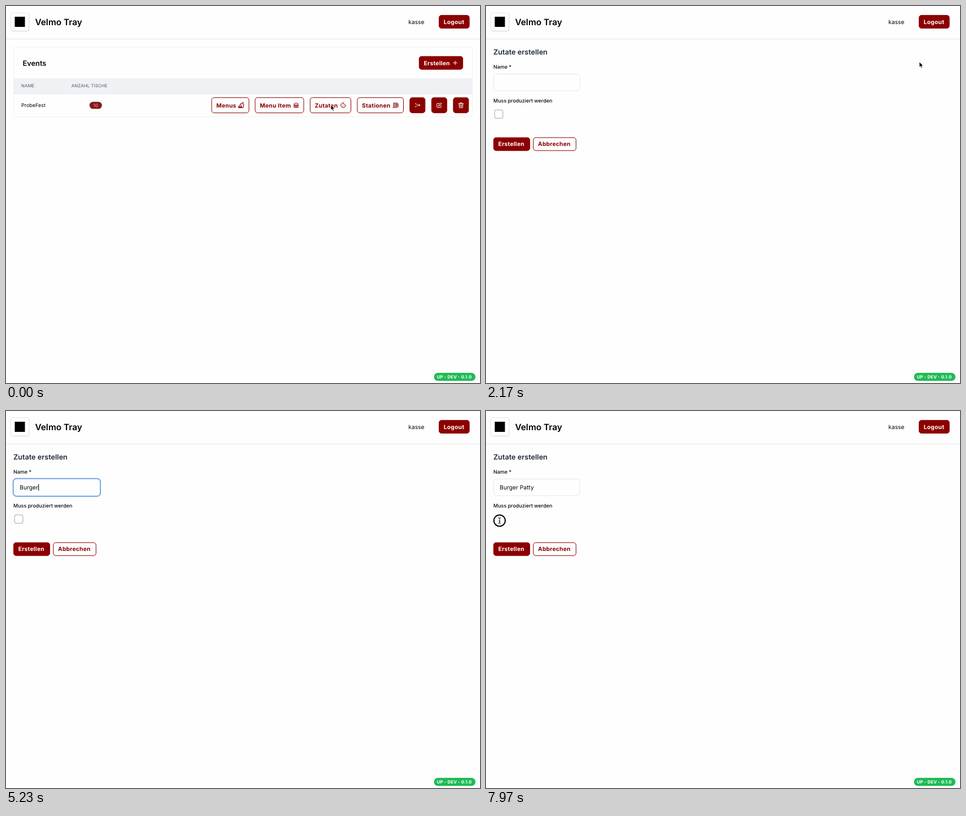
Animation of 839 by 668 pixels, one loop 8000 ms. Source, as an HTML page:

```html
<!DOCTYPE html>
<html lang="de">
<head>
<meta charset="utf-8">
<title>Zutat erstellen</title>
<style>
  html, body { margin: 0; width: 100%; height: 100%; overflow: hidden; background: #fefefe; }
  svg { display: block; width: 839px; height: 668px; }
  text { font-family: Inter, "Liberation Sans", sans-serif; text-rendering: geometricPrecision; white-space: pre; }
  .icon { fill: none; stroke-width: 1; stroke-linecap: round; stroke-linejoin: round; }
</style>
</head>
<body>
<svg id="stage" viewBox="0 0 839 668"></svg>
<script>
const RED = '#8b0000', INK = '#05070d', GREY = '#e5e7eb', PAPER = '#fefefe';

// y is the middle of the capital letters
const text = (s, x, y, size, weight = 400, fill = INK, more = '') =>
  `<text x="${x}" y="${y + size * 0.364}" font-size="${size}" font-weight="${weight}" fill="${fill}" ${more}>${s}</text>`;
const rect = (x, y, w, h, r, fill, stroke = 'none', more = '') =>
  `<rect x="${x}" y="${y}" width="${w}" height="${h}" rx="${r}" fill="${fill}" stroke="${stroke}" ${more}/>`;
const line = (x, y, w, color) => rect(x, y, w, 1, 0, color);
const wide = 'letter-spacing=".025em"';

const icons = {
  plus: 'M-3.3 0H3.3M0-3.3V3.3',
  back: 'M1.5-3L-1.5 0L1.5 3',
  meal: 'M-4.5 4.5H1V2.5H-4.5zM-4.5 2.5Q-4.5 0-1.8 0Q1 0 1 2.5M-2-.5V-2.5H4.5L3.5 4.5H1.5M1-2.5L2-5H4.2M-4 3.6H1',
  burger: 'M-4-1Q-4-4 0-4Q4-4 4-1zM-4 .8H4M-4 2.4H4V3Q4 4 3 4H-3Q-4 4-4 3z',
  cookie: 'M0-4.3A4.3 4.3 0 1 0 4.3 0Q2.5.2 2.2-1.6Q.2-2 0-4.3M-1.8-1.2h.1M-1.5 1.8h.1M1.3 1.7h.1M0 .2h.1',
  station: 'M-4 4V-4H1V4M-5 4H2M-2.8-2H-.3M-2.8 0H-.3M-2.8 2H-.3M1-2.5H2.5V2Q2.5 3.2 3.5 3.2Q4.4 3.2 4.4 2V-2L3-4',
  merge: 'M-4.2-2.6H-3Q-1.5-2.6-.8-.8Q-.4 0 .5 0H4.2M-4.2 2.6H-3Q-1.8 2.6-1.2 1.4M2.4-2L4.4 0L2.4 2',
  edit: 'M0-3.3H-3Q-4-3.3-4-2.3V3Q-4 4-3 4H2.3Q3.3 4 3.3 3V.5M-1.2 1.3L-.8-.6L3-4.2L4.2-3L.6.8z',
  trash: 'M-4.3-2.8H4.3M-1.6-2.8V-4.2H1.6V-2.8M-3.3-2.8L-2.8 4.4H2.8L3.3-2.8M-1.1-.8V2.5M1.1-.8V2.5'
};
const icon = (name, x, y, color) =>
  `<path class="icon" d="${icons[name]}" stroke="${color}" transform="translate(${x} ${y})"/>`;

function button(label, x, y, w, h, solid, mark) {
  const color = solid ? '#fff' : RED, mid = y + h / 2;
  return rect(x, y, w, h, 4.3, solid ? RED : PAPER, RED) +
    (label ? text(label, x + 8.2, mid, 10.24, 700, color, wide) : '') +
    (mark ? icon(mark, label ? x + w - 13.5 : x + w / 2, mid, color) : '');
}

function card(bottom, heads) {
  return rect(13.5, 72.5, 812, bottom - 72.5, 5, 'none', '#f1f2f4') +
    rect(14, 128, 811.5, 27, 0, '#eff1f5') + line(14, 155, 811.5, GREY) +
    heads.map(([s, x]) => text(s, x, 141.7, 7.68, 400, '#4b5563', wide)).join('') +
    button('Erstellen', 731.3, 89.3, 77.3, 23, true, 'plus');
}

const header =
  rect(9, 13, 32.5, 32.5, 4, '#e9eaec') + rect(8.5, 12, 32, 32, 4, '#fff', '#e2e4e8') +
  rect(15.5, 19, 18, 18, 0, '#000') +
  text('Velmo Tray', 51.5, 28.5, 15.36, 600, '#000') +
  text('kasse', 712.3, 28.2, 10.24) +
  button('Logout', 766.5, 16.4, 53.6, 23, true) + line(0, 58, 839, GREY) +
  rect(757.5, 650, 73.5, 14.3, 7.1, '#20bb56') +
  text('UP - DEV - 0.1.0', 762.8, 657, 7.68, 700, '#fff', wide);

const events = card(196.5, [['NAME', 27], ['ANZAHL TISCHE', 115.8]]) +
  text('Events', 29.5, 101, 12.8, 600) +
  text('ProbeFest', 27, 176, 8.96) +
  rect(147.8, 169.7, 22, 12.6, 6.3, '#7f1d1d') +
  text('10', 158.8, 176, 7.68, 400, '#f3a3a3', 'text-anchor="middle"') +
  [['Menus', 364, 66, 'meal'], ['Menu Item', 441, 86, 'burger'],
   ['Zutaten', 538.3, 72.2, 'cookie'], ['Stationen', 621.8, 81.7, 'station']]
    .map(([s, x, w, mark]) => button(s, x, 162.3, w, 27, false, mark)).join('') +
  ['merge', 'edit', 'trash'].map((mark, i) => button('', 714.8 + i * 38.5, 162.3, 27, 27, true, mark)).join('');

const items = card(185.5, [['NAME', 27], ['MUSS PRODUZIERT WERDEN', 281.8]]) +
  button('', 30.3, 89.3, 27, 23, true, 'back') +
  text('Zutaten', 68, 101, 12.8, 600) + icon('cookie', 133, 100.7, INK) +
  text('No Items', 121.8, 170.5, 8.96);

const form = text('Zutate erstellen', 13, 81.8, 12.65, 600, '#1f2937') +
  text('Name *', 13, 108, 8.96, 500) +
  rect(13.5, 120.5, 152.5, 29.5, 5, PAPER, GREY) +
  rect(12.7, 119.7, 154.4, 31.4, 6, PAPER, '#76a5e6', 'id="focus" stroke-width="2"') +
  text('', 24.3, 135.5, 10.24, 400, INK, 'id="value"') +
  rect(0, 129.5, 1.1, 11.5, 0, '#000', 'none', 'id="caret"') +
  text('Muss produziert werden', 13, 168, 8.96, 500) +
  rect(15.2, 184.2, 14.6, 14.6, 3, '#fff', '#c9cacd', 'id="box" stroke-width="1.8"') +
  button('Erstellen', 13.5, 233.2, 64, 23, true) + button('Abbrechen', 83.8, 233.2, 75.5, 23, false);

const stage = document.getElementById('stage');
stage.innerHTML = header +
  `<g id="events">${events}</g><g id="items">${items}</g><g id="form">${form}</g>
  <g id="pointer">
    <circle id="ring" fill="#fff" fill-opacity=".75" stroke="#000" stroke-width="2"/>
    <path id="arrow" d="M0 0V9.6L2.2 7.6L3.7 11.2L5.4 10.5L3.9 7H7z" fill="#000" stroke="#fff" stroke-width=".8"/>
    <path id="beam" class="icon" stroke="#000" d="M-2-5Q0-5 0-4Q0-5 2-5M0-4V4M-2 5Q0 5 0 4Q0 5 2 5M-1 1H1"/>
  </g>`;
const el = {};
stage.querySelectorAll('[id]').forEach(e => el[e.id] = e);
const show = (e, on) => e.style.display = on ? '' : 'none';

const ease = {
  in: u => u * u,
  out: u => u * (2 - u),
  both: u => u * u * (3 - 2 * u)
};
// time, x, y, easing towards this point
const path = [
  [0, 575, 175], [900, 575, 175, 'both'], [1530, 648, 111, 'in'], [1850, 768, 100, 'out'],
  [2170, 767, 99, 'both'], [2380, 767, 99, 'both'], [2970, 129, 142, 'both'],
  [6970, 129, 142, 'both'], [7130, 123, 143.5, 'in'], [7700, 24, 194.2, 'both'], [8000, 24, 194.2, 'both']
];
const clicks = [320, 1890, 3060, 7830], PRESS = 170;
const TYPED = 'Burger Patty';
const keys = [3950, 4150, 4370, 4950, 5080, 5210, 5920, 6050, 6170, 6290, 6400, 6500];
const LIST_END = 520, ITEMS_END = 2080, FOCUS = 3110, BLUR = 7830, BLINK = 490;

function pointerAt(t) {
  const i = path.findIndex(p => p[0] > t), [t0, x0, y0] = path[i - 1], [t1, x1, y1, kind] = path[i];
  const u = ease[kind]((t - t0) / (t1 - t0));
  return [x0 + (x1 - x0) * u, y0 + (y1 - y0) * u];
}

function drawField(t) {
  const focused = t >= FOCUS && t < BLUR;
  const count = keys.filter(k => k <= t).length;
  const idle = t - (count ? keys[count - 1] : FOCUS);
  const fade = Math.min(1, Math.max(0, (idle % (2 * BLINK) - BLINK) / 80));
  el.value.textContent = TYPED.slice(0, count);
  el.caret.setAttribute('x', 24.6 + (count ? el.value.getComputedTextLength() : 0));
  el.caret.setAttribute('opacity', 1 - fade);
  show(el.focus, focused);
  show(el.caret, focused);
  show(el.box, t < BLUR);
}

function drawPointer(t) {
  const [x, y] = pointerAt(t), beam = t >= 2900;
  const press = clicks.find(c => t >= c && t < c + PRESS);
  el.pointer.setAttribute('transform', `translate(${x} ${y})`);
  show(el.pointer, t < keys[0] || t >= 6970); // hidden while typing
  show(el.arrow, !beam);
  show(el.beam, beam);
  show(el.ring, press !== undefined);
  el.ring.setAttribute('r', 10 + 3 * Math.max(0, 1 - (t - (press || 0)) / 130));
}

function draw() {
  const t = performance.now() % 8000;
  show(el.events, t < LIST_END);
  show(el.items, t >= LIST_END && t < ITEMS_END);
  show(el.form, t >= ITEMS_END);
  drawField(t);
  drawPointer(t);
  requestAnimationFrame(draw);
}
draw();
</script>
</body>
</html>
```
